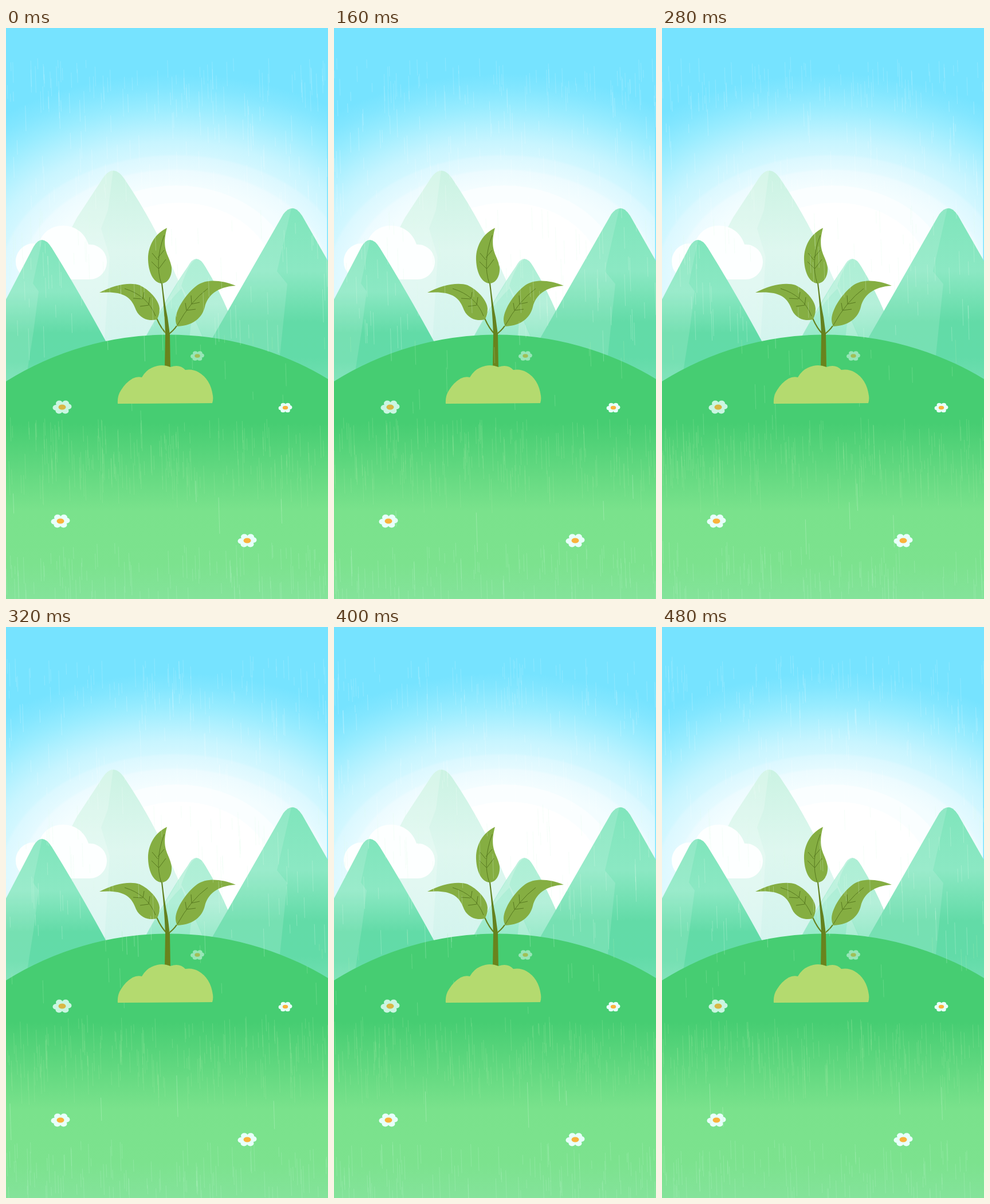
Recreate the animation shown at these times as an HTML page. Size 562x997 px, loop 0.52 s.

```html
<!DOCTYPE html>
<html lang="en">
<head>
<meta charset="utf-8">
<title>Seedling in the rain</title>
<style>
  html, body { margin: 0; width: 100%; height: 100%; overflow: hidden; background: #76e3ff; }
  svg { display: block; width: 562px; height: 997px; }
</style>
</head>
<body>
<svg viewBox="0 0 562 997">
  <defs>
    <radialGradient id="sky" gradientUnits="userSpaceOnUse" cx="0" cy="0" r="360"
        gradientTransform="translate(295 440) scale(1.4 1)">
      <stop offset=".46" stop-color="#f3fdff"/>
      <stop offset=".53" stop-color="#ecfbff"/>
      <stop offset=".54" stop-color="#e4faff"/>
      <stop offset=".6" stop-color="#dbf8ff"/>
      <stop offset=".61" stop-color="#d2f7ff"/>
      <stop offset=".67" stop-color="#c8f5ff"/>
      <stop offset=".75" stop-color="#b2f1ff"/>
      <stop offset=".84" stop-color="#98ecff"/>
      <stop offset=".93" stop-color="#82e6ff"/>
      <stop offset="1" stop-color="#76e3ff"/>
    </radialGradient>
    <linearGradient id="pale" x2="0" y2="1">
      <stop stop-color="#cbf3e3"/>
      <stop offset=".45" stop-color="#def7ef"/>
      <stop offset="1" stop-color="#d3f4ee"/>
    </linearGradient>
    <linearGradient id="slope" x2="0" y2="1">
      <stop stop-color="#80e5bc"/>
      <stop offset=".36" stop-color="#8be8c3"/>
      <stop offset=".65" stop-color="#62dba7"/>
      <stop offset=".85" stop-color="#62dba8"/>
      <stop offset="1" stop-color="#70dfb1"/>
    </linearGradient>
    <linearGradient id="small" x2="0" y2="1">
      <stop stop-color="#a4edd0"/>
      <stop offset=".5" stop-color="#aceed5"/>
      <stop offset="1" stop-color="#84e5be"/>
    </linearGradient>
    <linearGradient id="grass" gradientUnits="userSpaceOnUse" x1="0" y1="690" x2="0" y2="997">
      <stop stop-color="#46cd72"/>
      <stop offset=".5" stop-color="#7ae28c"/>
      <stop offset=".8" stop-color="#7ce28e"/>
      <stop offset="1" stop-color="#84e39a"/>
    </linearGradient>
    <linearGradient id="bark" x2="0" y2="1">
      <stop stop-color="#5f7f20"/>
      <stop offset="1" stop-color="#6b841c"/>
    </linearGradient>
    <g id="flower">
      <g fill="#e8fffb">
        <ellipse cx="-10.5" cy="1" rx="6" ry="5"/>
        <ellipse cx="-5" cy="-6.5" rx="6" ry="5"/>
        <ellipse cx="6" cy="-6.5" rx="6" ry="5"/>
        <ellipse cx="10.5" cy="-1" rx="6" ry="5"/>
        <ellipse cx="5.5" cy="6.5" rx="6" ry="5"/>
        <ellipse cx="-5.5" cy="6.5" rx="6" ry="5"/>
        <ellipse rx="9" ry="7"/>
      </g>
      <ellipse rx="6.5" ry="4.5" fill="#f9b33c"/>
    </g>
  </defs>

  <rect width="562" height="997" fill="url(#sky)"/>
  <ellipse cx="297" cy="440" rx="205" ry="165" fill="#fafeff"/>
  <ellipse cx="302" cy="440" rx="167" ry="135" fill="#fff"/>
  <rect x="560.5" width="1.5" height="420" fill="#76e3ff"/>

  <path d="M10 560Q90 395 124 331L166 267Q187 231 209 267Q240 313 268 368L354 560Z" fill="url(#pale)"/>
  <path d="M10 560Q90 395 124 331L166 267Q176 250 187 249L178 318 166 350 181 400 171 560Z" fill="#fff" opacity=".2"/>

  <path d="M45 439A31 31 0 0 1 17 408C17 386 38 371 57 378C67 335 130 333 144 378C162 377 176 391 176 408C176 426 162 439 146 439Z" fill="#fdffff"/>

  <path d="M232 560Q290 455 317 417Q332 389 348 417Q370 453 390 500L418 560Z" fill="url(#small)" opacity=".9"/>
  <path d="M332 404Q320 408 306 450L326 490 318 560H352L306 455Q270 490 232 560L310 427Q322 403 332 404Z" fill="#fff" opacity=".2"/>

  <path d="M0 474L48 382Q63 357 80 384Q126 458 177 552V620H0Z" fill="url(#slope)"/>
  <path d="M0 474L48 382Q55 371 63 370L47 446 57 460 48 530 37 600 0 620Z" fill="#fff" opacity=".13"/>

  <path d="M354 552L484 325Q501 303 517 328L562 407V620H354Z" fill="url(#slope)"/>
  <path d="M354 552L484 325Q491 315 498 315L473 425 491 447 478 572 354 580Z" fill="#fff" opacity=".13"/>

  <path d="M0 617A536 536 0 0 1 562 613V997H0Z" fill="url(#grass)"/>

  <use href="#flower" transform="translate(98 662)" opacity=".82"/>
  <use href="#flower" transform="translate(487.500 663) scale(.72)"/>
  <use href="#flower" transform="translate(334 572.500) scale(.72)" opacity=".5"/>
  <use href="#flower" transform="translate(95 861)"/>
  <use href="#flower" transform="translate(421 895)"/>

  <path d="M261 502Q269 523 281 535M298 520Q292 529 282 536" fill="none" stroke="#66821f" stroke-width="2.200"/>
  <path d="M277 594L278 535Q276 485 271 446L273 445Q277 482 282 505L286 535 287 594Z" fill="url(#bark)"/>
  <g fill="#85ae42">
    <path d="M281 349C258 360 247 383 248 405C249 430 259 446 273 446C285 444 290 430 289 418C286 396 270 390 281 349Z"/>
    <path d="M163 462C187 449 216 443 233 449C252 458 267 476 268 490Q268 502 263 509C247 513 231 506 225 488C217 467 200 459 163 462Z"/>
    <path d="M401 450C374 439 349 439 334 449C315 463 297 490 296 508Q296 516 299 521C324 520 342 508 347 487C352 467 368 452 401 450Z"/>
  </g>
  <g fill="none" stroke="#587a20" stroke-width="1">
    <path d="M271 446Q259 409 276 362M265 405L255 393M266 420L254 408M265 401L276 388M267 420L279 404"/>
    <path d="M261 503Q247 467 207 455M239 473L241 461M249 484L251 470M238 473L222 472M249 484L234 486"/>
    <path d="M299 519Q322 477 352 455M324 482L323 467M315 493L313 480M324 482L338 479M315 493L331 491"/>
  </g>

  <g id="rain" fill="none"></g>

  <path d="M195 656Q194 642 201 632Q209 619 221 612Q229 608 237 610Q246 594 264 590Q275 587 287 592Q303 586 313 597Q326 595 336 601Q357 613 361 642Q362 649 360 655Z" fill="#b4da6f"/>
</svg>
<script>
const LOOP = 520, STEP = 40;
const rain = document.getElementById('rain');

// Each band: streak count, top range, longest streak, colour, opacity
const bands = [
  { count: 85, from: 50, to: 115, length: 50, color: '#fff', alpha: .17 },
  { count: 90, from: 110, to: 300, length: 50, color: '#fff', alpha: .22 },
  { count: 85, from: 310, to: 530, length: 60, color: '#dcfae4', alpha: .28 },
  { count: 16, from: 530, to: 680, length: 45, color: '#a5edb0', alpha: .3 },
  { count: 190, from: 680, to: 790, length: 60, color: '#a0eaa2', alpha: .28 },
  { count: 4, from: 780, to: 860, length: 80, color: '#c4f4cb', alpha: .4 },
  { count: 110, from: 895, to: 985, length: 55, color: '#b4f2c3', alpha: .3 }
];

for (const band of bands) {
  band.path = document.createElementNS('http://www.w3.org/2000/svg', 'path');
  band.path.setAttribute('stroke', band.color);
  band.path.setAttribute('stroke-opacity', band.alpha);
  rain.append(band.path);
}

function randomizer(seed) {
  return () => {
    seed = (Math.imul(seed, 1664525) + 1013904223) >>> 0;
    return seed / 4294967296;
  };
}

function drawRain(step) {
  const random = randomizer(step * 7919 + 31);
  for (const { count, from, to, length, path } of bands) {
    let d = '';
    for (let i = 0; i < count; i++) {
      const x = random() * 562;
      const y = from + random() * (to - from);
      const fall = length * (.25 + .75 * random());
      d += `M${x.toFixed(1)} ${y.toFixed(1)}l${(fall * .03).toFixed(1)} ${fall.toFixed(1)}`;
    }
    path.setAttribute('d', d);
  }
}

let shown = -1;
function frame() {
  const step = Math.floor(performance.now() % LOOP / STEP);
  if (step !== shown) drawRain(shown = step);
  requestAnimationFrame(frame);
}
frame();
</script>
</body>
</html>
```
